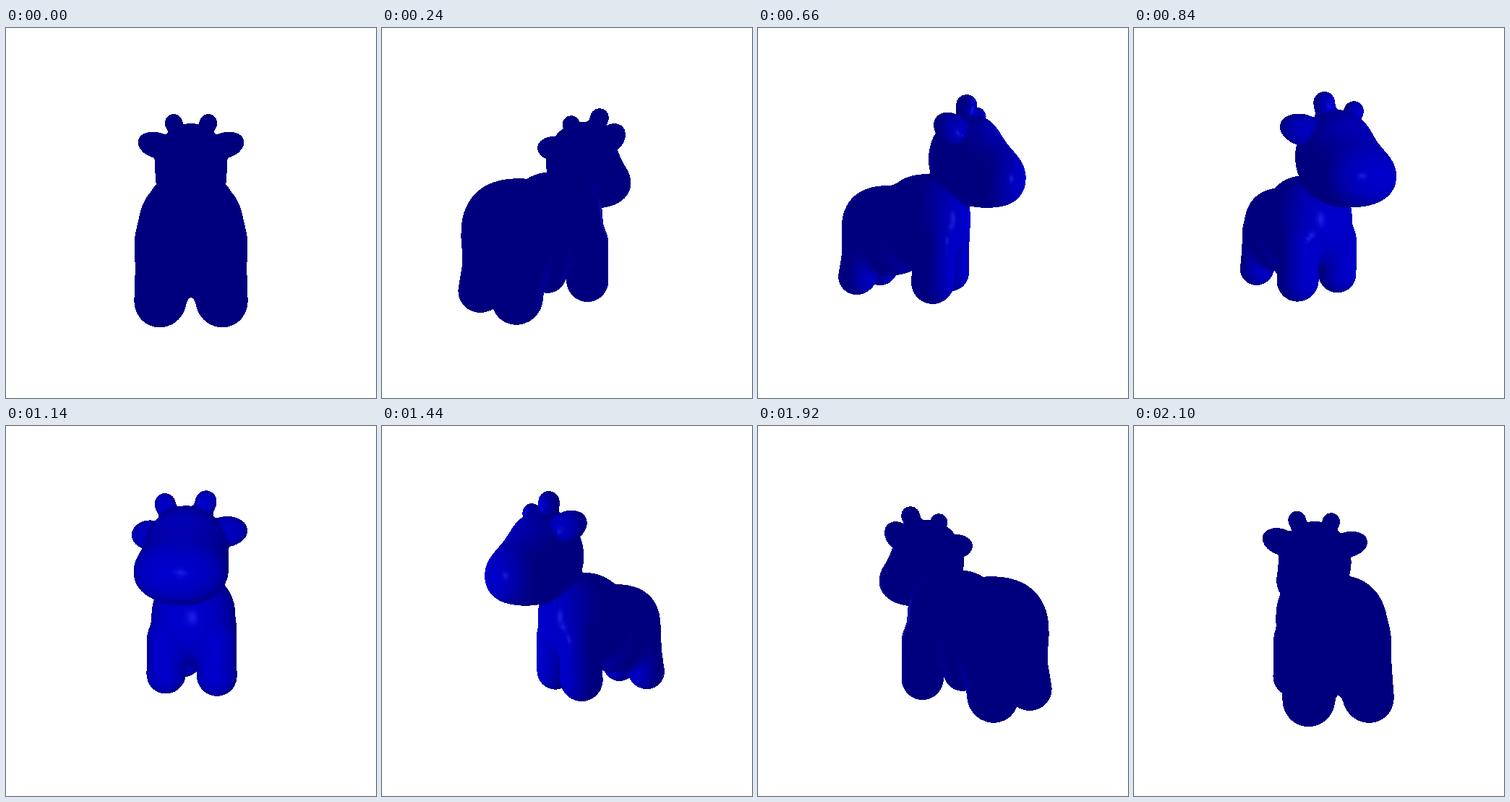
An HTML page with a canvas for the animation above (2.16 s loop, 512x512 px).

```html
<!DOCTYPE html>
<html lang="en">
<head>
<meta charset="utf-8">
<title>Turning toy cow</title>
<style>
  html, body { margin: 0; width: 100%; height: 100%; overflow: hidden; background: #fff; }
  canvas { display: block; width: 512px; height: 512px; }
</style>
</head>
<body>
<canvas id="stage" width="512" height="512"></canvas>
<script>
const SIZE = 512, MID = 256;
const DIST = 443.4;              // camera and lamp distance, also the focal length
const STEPS = 36, STEP_MS = 60;
const AMBIENT = 0.5, DIFFUSE = 0.3, SPECULAR = 0.12, SHINE = 64;

// ---- Shape: x to the side (mirrored), y up, z forward ----
function smin(a, b, k) {
  const h = Math.max(k - Math.abs(a - b), 0) / k;
  return Math.min(a, b) - h * h * k / 4;
}

// Approximate distance; a power above 2 makes the ellipsoid boxier.
function ellipsoid(x, y, z, rx, ry, rz, power = 2) {
  const a = Math.abs(x / rx), b = Math.abs(y / ry), c = Math.abs(z / rz);
  const k = Math.pow(a ** power + b ** power + c ** power, 1 / power);
  if (k < 1e-6) return -Math.min(rx, ry, rz);
  const e = power - 1;
  return (k - 1) / Math.hypot((a / k) ** e / rx, (b / k) ** e / ry, (c / k) ** e / rz);
}

function capsule(x, y, z, [ax, ay, az, ar], [bx, by, bz, br]) {
  const dx = bx - ax, dy = by - ay, dz = bz - az;
  const px = x - ax, py = y - ay, pz = z - az;
  let t = (px * dx + py * dy + pz * dz) / (dx * dx + dy * dy + dz * dz);
  t = Math.min(1, Math.max(0, t));
  return Math.hypot(px - dx * t, py - dy * t, pz - dz * t) - (ar + (br - ar) * t);
}

const HORN = [[18, 114, 38, 12], [26, 135.5, 41, 13.5]];
const FRONT_LEG = [[36, -38, 1, 26], [35.5, -88, -1, 27.5]];
const BACK_LEG = [[32, -30, -106, 25.5], [31, -88.5, -117, 26.5]];
const TAIL = [[0, 2, -141, 9], [0, -12, -152, 8.5]];
const TILT = 0.15, SWEEP = 0.4;

function ear(x, y, z) {
  const dx = x - 50, dy = y - 100, dz = z - 30.5;
  const out = dx * Math.cos(SWEEP) - dz * Math.sin(SWEEP);
  const front = dz * Math.cos(SWEEP) + dx * Math.sin(SWEEP);
  const along = out * Math.cos(TILT) + dy * Math.sin(TILT);
  const up = dy * Math.cos(TILT) - out * Math.sin(TILT);
  return ellipsoid(along, up, front, 29, 19, 15);
}

function cow(x, y, z) {
  x = Math.abs(x);
  let body = smin(ellipsoid(x, y + 25, z + 84, 58, 65, 67, 2.4),
                  ellipsoid(x, y + 10, z + 24, 60, 64, 60, 2.3), 10);
  body = smin(body, capsule(x, y, z, ...FRONT_LEG), 9);
  body = smin(body, capsule(x, y, z, ...BACK_LEG), 9);
  body = smin(body, capsule(x, y, z, ...TAIL), 6);
  let head = smin(ellipsoid(x, y - 72, z - 35, 54, 60, 52),
                  ellipsoid(x, y - 45, z - 72, 54.5, 37, 39, 2.15), 24);
  head = smin(head, ear(x, y, z), 4);
  head = smin(head, capsule(x, y, z, ...HORN), 4);
  return smin(head, body, 5);
}

function gradient(x, y, z) {
  const e = 0.4;
  return [cow(x + e, y, z) - cow(x - e, y, z),
          cow(x, y + e, z) - cow(x, y - e, z),
          cow(x, y, z + e) - cow(x, y, z - e)].map(v => v / (2 * e));
}

// ---- Mesh by surface nets ----
function buildMesh() {
  const cell = 4, lo = [-94, -126, -176], n = [48, 71, 76];
  const stride = [1, n[0], n[0] * n[1]];
  const total = n[0] * n[1] * n[2];
  const field = new Float32Array(total);
  const ids = new Int32Array(total).fill(-1);
  const points = [], normals = [], quads = [];

  const eachCell = (from, to, visit) => {
    for (let k = from; k < n[2] - to; k++)
      for (let j = from; j < n[1] - to; j++)
        for (let i = from; i < n[0] - to; i++)
          visit(i, j, k, i + j * stride[1] + k * stride[2]);
  };

  eachCell(0, 0, (i, j, k, at) => {
    field[at] = cow(lo[0] + i * cell, lo[1] + j * cell, lo[2] + k * cell);
  });

  eachCell(0, 1, (i, j, k, at) => {
    const sum = [0, 0, 0];
    let hits = 0;
    for (let c = 0; c < 8; c++) {
      const bits = [c & 1, c >> 1 & 1, c >> 2];
      const here = at + bits[0] + bits[1] * stride[1] + bits[2] * stride[2];
      for (let a = 0; a < 3; a++) {
        if (bits[a]) continue;
        const d0 = field[here], d1 = field[here + stride[a]];
        if (d0 < 0 === d1 < 0) continue;
        for (let b = 0; b < 3; b++) sum[b] += bits[b] + (b === a ? d0 / (d0 - d1) : 0);
        hits++;
      }
    }
    if (!hits) return;
    const p = [i, j, k].map((v, a) => lo[a] + cell * (v + sum[a] / hits));
    let g = gradient(...p);
    const len2 = g[0] * g[0] + g[1] * g[1] + g[2] * g[2] || 1;
    const pull = Math.max(-2, Math.min(2, cow(...p) / len2));
    for (let a = 0; a < 3; a++) p[a] -= g[a] * pull;
    g = gradient(...p);
    const len = Math.hypot(...g) || 1;
    ids[at] = points.length;
    points.push(p);
    normals.push(g.map(v => v / len));
  });

  eachCell(1, 1, (i, j, k, at) => {
    for (let a = 0; a < 3; a++) {
      if (field[at] < 0 === field[at + stride[a]] < 0) continue;
      const u = stride[(a + 1) % 3], v = stride[(a + 2) % 3];
      quads.push([ids[at], ids[at - u], ids[at - u - v], ids[at - v]]);
    }
  });
  return { points, normals, quads };
}

// ---- Drawing ----
const ctx = document.getElementById('stage').getContext('2d');
const image = ctx.createImageData(SIZE, SIZE);
const pixels = new Uint32Array(image.data.buffer);
const depth = new Float32Array(SIZE * SIZE);
const { points, normals, quads } = buildMesh();
const perPoint = () => new Float32Array(points.length);
const sx = perPoint(), sy = perPoint(), sw = perPoint();
const tone = perPoint(), gloss = perPoint();

function shade(i, eye) {
  const p = points[i], m = normals[i];
  const toLamp = [-p[0], -p[1], DIST - p[2]];
  const toEye = [eye[0] - p[0], -p[1], eye[1] - p[2]];
  const dot = (a, b) => a[0] * b[0] + a[1] * b[1] + a[2] * b[2];
  const lampLen = Math.hypot(...toLamp);
  const facing = Math.max(0, dot(m, toLamp) / lampLen);
  const mirror = m.map((v, a) => 2 * facing * v - toLamp[a] / lampLen);
  const glint = facing && Math.max(0, dot(mirror, toEye) / Math.hypot(...toEye));
  tone[i] = 255 * (AMBIENT + DIFFUSE * facing);
  gloss[i] = 255 * SPECULAR * Math.pow(glint, SHINE);
}

function triangle(a, b, c) {
  const ax = sx[a], ay = sy[a], bx = sx[b], by = sy[b], cx = sx[c], cy = sy[c];
  const area = (bx - ax) * (cy - ay) - (by - ay) * (cx - ax);
  if (!area) return;
  const x0 = Math.ceil(Math.min(ax, bx, cx)), x1 = Math.floor(Math.max(ax, bx, cx));
  const y0 = Math.ceil(Math.min(ay, by, cy)), y1 = Math.floor(Math.max(ay, by, cy));
  for (let y = y0; y <= y1; y++) {
    for (let x = x0; x <= x1; x++) {
      const u = ((bx - x) * (cy - y) - (by - y) * (cx - x)) / area;
      const v = ((cx - x) * (ay - y) - (cy - y) * (ax - x)) / area;
      const w = 1 - u - v;
      if (u < -1e-5 || v < -1e-5 || w < -1e-5) continue;
      const near = u * sw[a] + v * sw[b] + w * sw[c];
      const at = y * SIZE + x;
      if (near <= depth[at]) continue;
      depth[at] = near;
      const white = u * gloss[a] + v * gloss[b] + w * gloss[c];
      const blue = Math.min(255, white + u * tone[a] + v * tone[b] + w * tone[c]);
      pixels[at] = (0xff000000 | blue << 16 | white << 8 | white) >>> 0;
    }
  }
}

function draw(step) {
  const angle = step / STEPS * 2 * Math.PI;
  const cos = Math.cos(angle), sin = Math.sin(angle);
  const eye = [DIST * sin, -DIST * cos];
  pixels.fill(0xffffffff);
  depth.fill(0);
  points.forEach((p, i) => {
    const scale = DIST / (DIST - p[0] * sin + p[2] * cos);
    sx[i] = MID - 0.5 + (p[0] * cos + p[2] * sin) * scale;
    sy[i] = MID - 0.5 - p[1] * scale;
    sw[i] = scale;
    shade(i, eye);
  });
  for (const [a, b, c, d] of quads) {
    triangle(a, b, c);
    triangle(a, c, d);
  }
  ctx.putImageData(image, 0, 0);
}

const start = performance.now();
let shown = -1;
function tick() {
  const step = Math.floor((performance.now() - start) / STEP_MS) % STEPS;
  if (step !== shown) draw(shown = step);
  requestAnimationFrame(tick);
}
tick();
</script>
</body>
</html>
```
